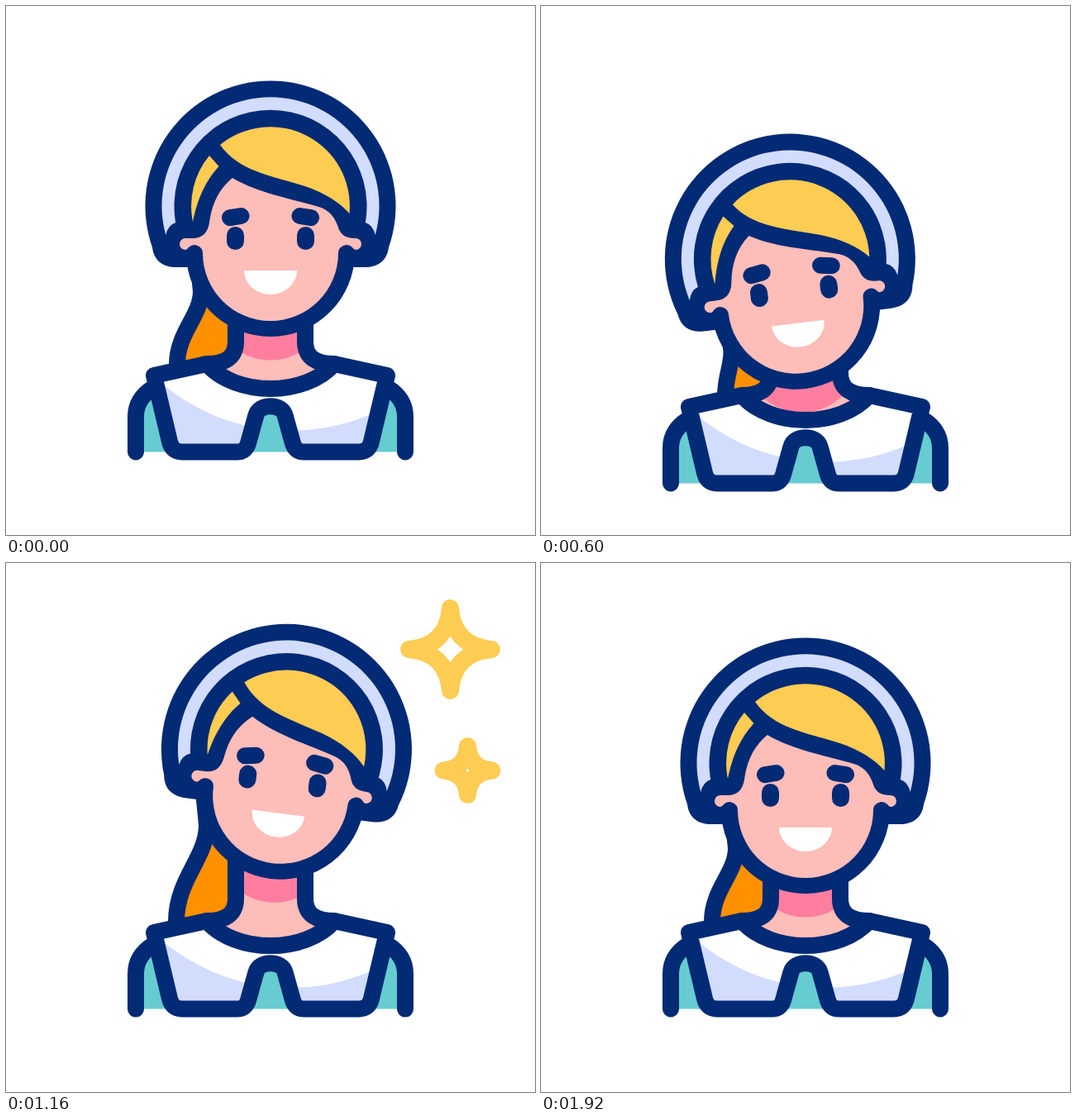
An HTML page that plays this animation: 640x640 px, repeating every 2000 ms.

```html
<!DOCTYPE html>
<html lang="en">
<head>
<meta charset="utf-8">
<title>Nodding girl</title>
<style>
  html, body { margin: 0; width: 100%; height: 100%; overflow: hidden; background: #fff; }
  svg { display: block; width: 100%; height: 100%; }
  .line { fill: none; stroke: #022a75; stroke-width: 20; stroke-linecap: round; stroke-linejoin: round; }
  .navy { fill: #022a75; }
  .skin { fill: #fdbdb8; }
  .hair { fill: #fdcc52; }
  .lilac { fill: #d2dcfd; }
  .teal { fill: #66ccd1; }
  .star { fill: none; stroke: #fdcc52; stroke-width: 21; stroke-linecap: round; stroke-linejoin: round; }
</style>
</head>
<body>
<svg viewBox="0 0 640 640">
  <defs>
    <path id="neckShape" d="M278 350V406C278 426 264 433 243 433C278 473 362 473 397 433C376 433 362 426 362 406V350Z"/>
    <path id="collarShape" d="M243 433L179 447L198 527Q201 539.5 213 539.5H279Q290 539.5 293 529L302.5 495C306 480.5 334 480.5 337.5 495L347 529Q350 539.5 361 539.5H427Q439 539.5 442 527L461 447L397 433C362 473 278 473 243 433Z"/>
    <clipPath id="neckClip"><use href="#neckShape"/></clipPath>
    <clipPath id="collarClip"><use href="#collarShape"/></clipPath>
  </defs>

  <g id="body">
    <path class="teal" d="M157 539.5V497Q157 476 178 462H462Q483 476 483 497V539.5Z"/>
    <path class="line" d="M157 539.5V497Q157 475 178 462M483 539.5V497Q483 475 462 462"/>

    <path id="tailFill" fill="#ff9100"/>
    <path id="tailLine" class="line"/>

    <use href="#neckShape" class="skin"/>
    <g clip-path="url(#neckClip)">
      <path id="shade" fill="#ff7ea0" d="M220 320V358.5H250A70 70 0 0 0 390 358.5H420V320Z"/>
    </g>
    <path class="line" d="M278 350V406C278 426 264 433 243 433M362 350V406C362 426 376 433 397 433"/>

    <use href="#collarShape" fill="#fff"/>
    <path class="lilac" clip-path="url(#collarClip)" d="M190 458A243 243 0 0 0 452 489V560H190Z"/>
    <use href="#collarShape" class="line"/>

    <g id="head">
      <path class="navy" d="M177 292A151.5 151.5 0 1 1 463 292C461 308 450 316 434 316H206C190 316 179 308 177 292Z"/>
      <circle class="navy" cx="320" cy="298" r="102"/>
      <path class="lilac" d="M193.3 277A131.5 131.5 0 1 1 446.7 277Q444 265 434.8 262A116.5 116.5 0 1 0 205.2 262Q196 265 193.3 277Z"/>
      <path class="hair" d="M259 168A96 96 0 0 1 415.5 251C404 238 386 226 360 217.5C320 205 282 200 259 168Z"/>
      <path class="hair" d="M246 181L257.5 194Q234 219 226 261A96 96 0 0 1 246 181Z"/>
      <path class="skin" d="M238 299A82 82 0 0 0 402 299A10 10 0 0 1 419 292Q421 295 423 295A7 7 0 0 0 423 281C411 281 405 277 402 268C398 256 392 248 380 243.5C346 233 306 227 274 208C257 222 249 240 246 262Q243 281 226 281H217A7 7 0 0 0 217 295Q219 295 221 292A10 10 0 0 1 238 299Z"/>
      <rect class="navy" x="267" y="267" width="21" height="28" rx="10.5"/>
      <rect class="navy" x="352" y="267" width="21" height="28" rx="10.5"/>
      <path class="line" d="M271 256.2L284.5 254M355.5 254L369 256.2"/>
      <path fill="#fff" d="M288 320H352A32 29 0 0 1 288 320Z"/>
    </g>
  </g>

  <path class="star" id="bigStar" transform="translate(537.5 104.5)"/>
  <path class="star" id="smallStar" transform="translate(558.5 251)"/>
</svg>

<script>
const LOOP = 2000, STEP = 40;
const $ = id => document.getElementById(id);
const progress = (t, from, to) => Math.min(1, Math.max(0, (t - from) / (to - from)));
const smooth = u => u * u * (3 - 2 * u);
const easeOut = power => u => 1 - (1 - u) ** power;

// keys: [time, value] pairs
function track(t, keys, ease) {
  let value = keys[0][1];
  for (let i = 1; i < keys.length; i++) {
    const [t0, v0] = keys[i - 1], [t1, v1] = keys[i];
    if (t >= t0) value = v0 + (v1 - v0) * ease(progress(t, t0, t1));
  }
  return value;
}

// The ponytail hangs from the moving head and ends behind the collar
function drawTail(nod, tilt, sway) {
  const a = tilt * Math.PI / 180, sin = Math.sin(a), cos = Math.cos(a);
  const x = 320 - 84 * cos + 50 * sin;
  const y = 395 + nod - 84 * sin - 50 * cos;
  const endX = 207 + sway, endY = 434, drop = endY - y;
  const curve = `M${x - 3} ${y - 30}L${x} ${y}C${x} ${y + drop * 0.34} ${endX} ${y + drop * 0.56} ${endX} ${endY}V446`;
  $("tailLine").setAttribute("d", curve);
  $("tailFill").setAttribute("d", `${curve}H285V${y - 30}Z`);
}

// Four concave sides; the stroke keeps its width while the star grows
function drawStar(star, size, opacity) {
  const s = size, c = size * 0.08;
  star.setAttribute("d", `M0 ${-s}Q${c} ${-c} ${s} 0Q${c} ${c} 0 ${s}Q${-c} ${c} ${-s} 0Q${-c} ${-c} 0 ${-s}Z`);
  star.setAttribute("opacity", size > 0 ? opacity : 0);
}

function pulse(t, size, start, full, fade, end) {
  return [size * easeOut(2.57)(progress(t, start, full)), 1 - progress(t, fade, end)];
}

function render(t) {
  const sink = track(t, [[0, 0], [600, 38], [1180, 0]], easeOut(1.9));
  const nod = track(t, [[40, 0], [600, 25], [1160, -18], [1900, 0]], smooth);
  const tilt = track(t, [[40, 0], [600, -7], [1160, 7.3], [1900, 0]], smooth);
  const sway = track(t, [[40, 0], [600, 16], [1160, -1], [1900, 0]], smooth);
  const pose = `translate(0 ${nod}) rotate(${tilt} 320 395)`;

  $("body").setAttribute("transform", `translate(0 ${sink})`);
  $("head").setAttribute("transform", pose);
  $("shade").setAttribute("transform", pose);
  drawTail(nod, tilt, sway);

  drawStar($("bigStar"), ...pulse(t, 53.5, 640, 1440, 1380, 1620));
  drawStar($("smallStar"), ...(t < 1000
    ? pulse(t, 38.5, 610, 820, 800, 880)
    : pulse(t, 38.5, 1070, 1280, 1260, 1340)));
}

const start = performance.now();
function tick() {
  const t = (performance.now() - start) % LOOP;
  render(Math.floor(t / STEP) * STEP);
  requestAnimationFrame(tick);
}
tick();
</script>
</body>
</html>
```
